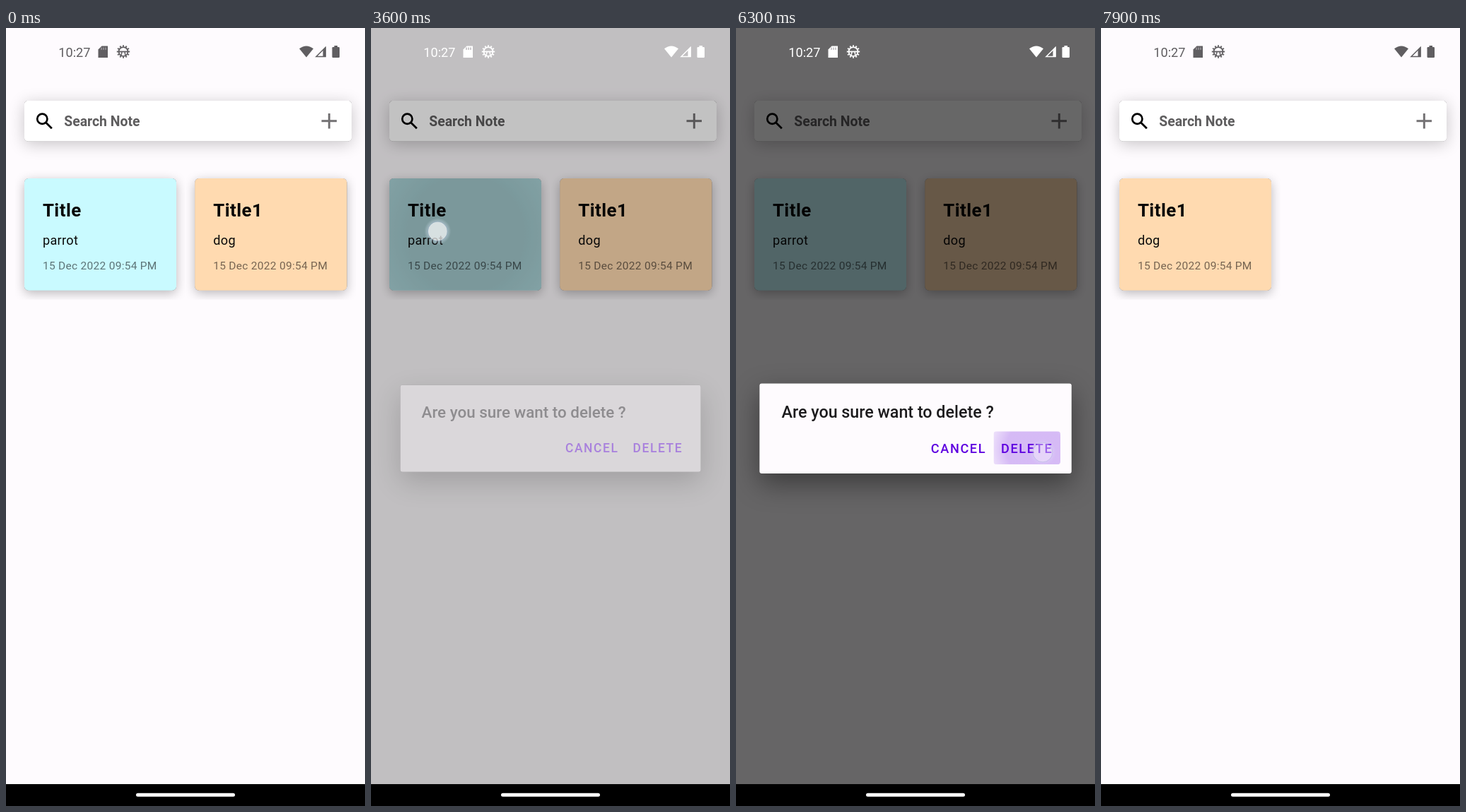
Animation, 508 px wide and 1102 px high, one loop 8000 ms. Source, as an HTML page with a canvas:

```html
<!DOCTYPE html>
<html lang="en">
<head>
<meta charset="utf-8">
<title>Notes</title>
<style>
  html, body { margin: 0; width: 100%; height: 100%; overflow: hidden; background: #fefbfe; }
  canvas { display: block; width: 100vw; height: 100vh; }
</style>
</head>
<body>
<canvas id="stage" width="508" height="1102"></canvas>
<script>
const ctx = document.getElementById('stage').getContext('2d');
const LOOP = 8000, STEP = 100;
const PAPER = '#fefbfe', PURPLE = '#5e00e0';
const DATE = '15 Dec 2022 09:54 PM';

const ramp = (t, from, to) => Math.min(1, Math.max(0, (t - from) / (to - from)));
const pulse = (t, a, b, c, d) => ramp(t, a, b) * (1 - ramp(t, c, d));
const easeInOut = p => 0.5 - Math.cos(p * Math.PI) / 2;

function layer(draw) {
  ctx.save();
  draw();
  ctx.restore();
}

function text(str, x, y, size, color, weight = 400, spacing = 0) {
  ctx.font = `${weight} ${size}px Roboto, sans-serif`;
  ctx.letterSpacing = `${spacing * size}px`;
  ctx.fillStyle = color;
  ctx.fillText(str, x, y);
}

function roundRect(x, y, w, h, r, color) {
  ctx.beginPath();
  ctx.roundRect(x, y, w, h, r);
  ctx.fillStyle = color;
  ctx.fill();
}

function polygon(points, color) {
  ctx.beginPath();
  points.forEach(([x, y]) => ctx.lineTo(x, y));
  ctx.closePath();
  ctx.fillStyle = color;
  ctx.fill();
}

function line(x1, y1, x2, y2, width, color) {
  ctx.beginPath();
  ctx.moveTo(x1, y1);
  ctx.lineTo(x2, y2);
  ctx.lineWidth = width;
  ctx.strokeStyle = color;
  ctx.stroke();
}

function ring(x, y, r, width, color) {
  ctx.beginPath();
  ctx.arc(x, y, r, 0, Math.PI * 2);
  ctx.lineWidth = width;
  ctx.strokeStyle = color;
  ctx.stroke();
}

// Casts the shadow only outside the box, so translucent boxes stay clean.
function shadow(x, y, w, h, r, spread, blur, drop, alpha) {
  layer(() => {
    ctx.beginPath();
    ctx.rect(x - spread, y - spread, w + spread * 2, h + spread * 2);
    ctx.roundRect(x, y, w, h, r);
    ctx.clip('evenodd');
    ctx.shadowColor = `rgba(0,0,0,${alpha})`;
    ctx.shadowBlur = blur;
    ctx.shadowOffsetY = drop;
    roundRect(x, y, w, h, r, '#000');
  });
}

function ripple(box, cx, cy, radius, rgb, inner, outer) {
  layer(() => {
    ctx.beginPath();
    ctx.roundRect(...box);
    ctx.clip();
    const g = ctx.createRadialGradient(cx, cy, radius * 0.6, cx, cy, radius);
    g.addColorStop(0, `rgba(${rgb},${inner})`);
    g.addColorStop(1, `rgba(${rgb},${outer})`);
    ctx.fillStyle = g;
    ctx.fillRect(...box.slice(0, 4));
  });
}

function touch(x, y, alpha) {
  if (!alpha) return;
  layer(() => {
    ctx.globalAlpha = alpha;
    const g = ctx.createRadialGradient(x, y, 13, x, y, 19);
    g.addColorStop(0, 'rgba(225,238,255,.4)');
    g.addColorStop(1, 'rgba(225,238,255,0)');
    ctx.beginPath();
    ctx.arc(x, y, 19, 0, Math.PI * 2);
    ctx.arc(x, y, 13, 0, Math.PI * 2, true);
    ctx.fillStyle = g;
    ctx.fill();
    ctx.beginPath();
    ctx.arc(x, y, 13.5, 0, Math.PI * 2);
    ctx.fillStyle = 'rgba(255,255,255,.7)';
    ctx.fill();
    ring(x, y, 13.8, 1, 'rgba(130,155,180,.45)');
  });
}

function statusBar(color) {
  text('10:27', 74.3, 40.5, 18.1, color);

  polygon([[135.5, 25.5], [144, 25.5], [144, 42], [130.5, 42], [130.5, 30.5]], color);
  for (const x of [135, 138, 141]) line(x, 27.5, x, 31, 1.2, '#aaa7ab');

  ring(166, 33.5, 6.4, 1.8, color);
  for (let i = 0; i < 12; i++) {
    const a = i * Math.PI / 6, c = Math.cos(a), s = Math.sin(a);
    line(166 + c * 7, 33.5 + s * 7, 166 + c * 9.2, 33.5 + s * 9.2, 1.9, color);
  }
  line(160, 33.5, 172, 33.5, 1.8, color);
  line(164, 34, 163, 39, 1.5, color);
  line(168, 34, 169, 39, 1.5, color);

  ctx.beginPath();
  ctx.moveTo(425, 41.5);
  ctx.lineTo(415, 29.2);
  ctx.quadraticCurveTo(425, 21.6, 435, 29.2);
  ctx.closePath();
  ctx.fillStyle = color;
  ctx.fill();

  ctx.beginPath();
  ctx.moveTo(439, 40.5);
  ctx.lineTo(452, 40.5);
  ctx.lineTo(452, 27.5);
  ctx.closePath();
  ctx.lineWidth = 1.5;
  ctx.strokeStyle = color;
  ctx.stroke();
  polygon([[448.5, 31], [452.5, 27], [452.5, 41], [448.5, 41]], color);

  roundRect(461.5, 27, 10.5, 15, 1.2, color);
  ctx.fillRect(464.5, 25, 4.5, 3);
}

function searchBar() {
  shadow(26, 103, 463, 57.5, 5, 28, 22, 4, 0.22);
  roundRect(26, 103, 463, 57.5, 5, '#fff');
  ring(51.3, 128.8, 7.1, 2.7, '#000');
  line(56, 133.5, 64.8, 142.3, 2.8, '#000');
  text('Search Note', 82.3, 139.3, 19.4, '#5e5d5e', 700);
  line(446.5, 131.7, 468, 131.7, 3, '#747274');
  line(457.3, 121, 457.3, 142.5, 3, '#747274');
}

function card(x, title, body, color, alpha = 1) {
  if (!alpha) return;
  layer(() => {
    ctx.globalAlpha = alpha;
    shadow(x, 213, 215, 158.7, 6, 13, 15, 4, 0.27);
    roundRect(x, 213, 215, 158.7, 6, color);
    text(title, x + 25.9, 266.5, 25.87, '#050505', 700, 0.0179);
    text(body, x + 25.9, 306.7, 18.11, '#0a0a0a', 400, 0.0179);
    text(DATE, x + 25.9, 341.6, 15.52, 'rgba(0,0,0,.54)', 400, 0.0179);
  });
}

function dialog(alpha, scale, press) {
  ctx.globalAlpha = alpha;
  ctx.fillStyle = 'rgba(0,0,0,.595)';
  ctx.fillRect(0, 0, 508, 1071);
  ctx.translate(254, 567);
  ctx.scale(scale, scale);
  ctx.translate(-254, -567);
  shadow(33.3, 503.5, 441.5, 127.5, 3, 60, 38, 14, 0.42);
  roundRect(33.3, 503.5, 441.5, 127.5, 3, PAPER);
  text('Are you sure want to delete ?', 64.5, 551.6, 23.28, '#1c1b1d', 500);
  if (press) {
    ripple([364.5, 571.3, 94.5, 47, 4], 422, 596, 30 + 36 * press, '98,0,220', 0.26, 0.08);
  }
  text('CANCEL', 275.8, 602, 18.11, PURPLE, 500, 0.0893);
  text('DELETE', 375, 602, 18.11, PURPLE, 500, 0.0893);
}

function draw(t) {
  ctx.fillStyle = PAPER;
  ctx.fillRect(0, 0, 508, 1102);
  searchBar();

  const removed = 1 - ramp(t, 6555, 6676);
  const slide = easeInOut(ramp(t, 6676, 6926));
  card(26, 'Title', 'parrot', '#c9faff', removed);
  card(267.3 - 241.3 * slide, 'Title1', 'dog', '#ffdab0');

  const held = pulse(t, 2780, 3000, 3850, 4150);
  if (held) {
    const grow = ramp(t, 2780, 3000);
    ripple([26, 213, 215, 158.7, 6], 94 + 40 * grow, 288 + 4 * grow, 20 + 118 * grow,
      '0,0,0', 0.2 * held, 0.15 * held * grow);
  }

  const shown = pulse(t, 3540, 3690, 6370, 6510);
  if (shown) {
    const press = ramp(t, 6080, 6300);
    layer(() => dialog(shown, 0.9 + 0.1 * Math.sqrt(ramp(t, 3540, 3690)), press));
  }
  statusBar(t >= 3600 && t < 6500 ? '#fff' : '#605e61');

  touch(94.3, 288, pulse(t, 2700, 2800, 3800, 3900));
  touch(434, 601, 0.55 * pulse(t, 6000, 6100, 6310, 6400));

  ctx.fillStyle = '#000';
  ctx.fillRect(0, 1071, 508, 31);
  roundRect(184, 1083.8, 140, 5, 2.5, '#fff');
}

function tick(now) {
  draw(Math.floor((now % LOOP) / STEP) * STEP);
  requestAnimationFrame(tick);
}
requestAnimationFrame(tick);
</script>
</body>
</html>
```
